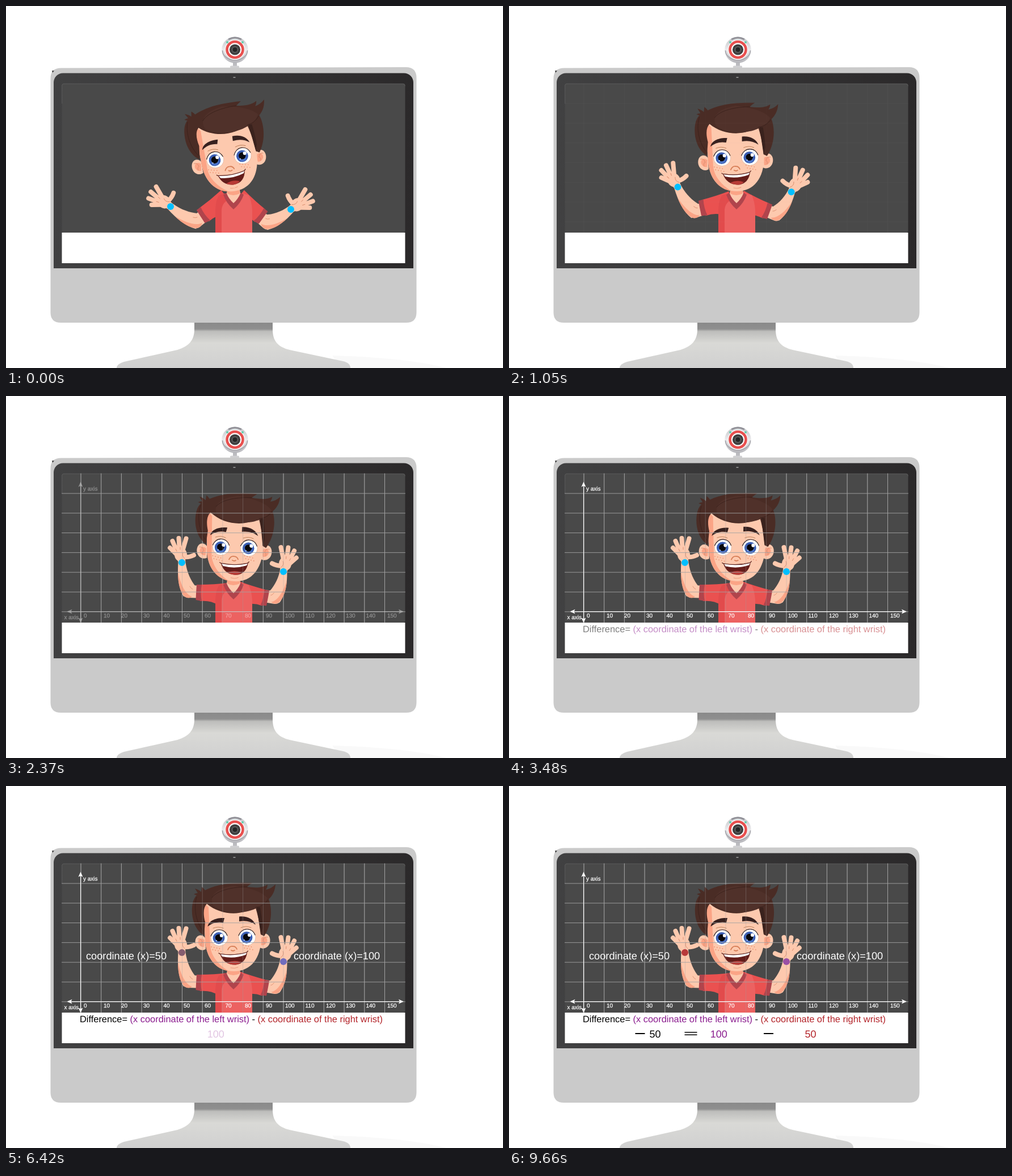
Write an HTML page that moves like this. It is 876 by 639 pixels and loops after 9750 ms.

```html
<!DOCTYPE html>
<html lang="en">
<head>
<meta charset="utf-8">
<title>Wrist difference</title>
<style>
  html, body { margin: 0; width: 100%; height: 100%; overflow: hidden; background: #fff; }
  svg { display: block; }
  text { font-family: "Liberation Sans", Arial, sans-serif; white-space: pre; text-rendering: geometricPrecision; }
</style>
</head>
<body>
<svg id="stage" width="876" height="639" viewBox="0 0 876 639"></svg>
<script>
const LOOP = 9750;
const SKIN = '#fdc9ae', SHADE = '#fba486', RED = '#ea5150', DARK_RED = '#b0444c';
const PURPLE = '#8b1d8f', CRIMSON = '#b3242a';
const PIVOT = { x: 400, y: 325 };
const SHOULDER = { x: 378, y: 347 };
const MIRROR = 798;

const range = n => [...Array(n).keys()];
const path = (d, fill, extra = '') => `<path d="${d}" fill="${fill}" ${extra}/>`;
const line = (d, color, width, extra = '') =>
  path(d, 'none', `stroke="${color}" stroke-width="${width}" stroke-linecap="round" stroke-linejoin="round" ${extra}`);
const circle = (x, y, r, fill, extra = '') => `<circle cx="${x}" cy="${y}" r="${r}" fill="${fill}" ${extra}/>`;
const text = (x, y, size, fill, content) => `<text x="${x}" y="${y}" font-size="${size}" fill="${fill}">${content}</text>`;
const group = (id, content) => `<g id="${id}">${content}</g>`;

const defs = `<defs>
  <linearGradient id="bezel"><stop stop-color="#414142"/><stop offset="1" stop-color="#2b292a"/></linearGradient>
  <linearGradient id="stand" x2="0" y2="1">
    <stop stop-color="#8a8a8a"/><stop offset=".14" stop-color="#8f8f8f"/><stop offset=".19" stop-color="#bdbdbb"/>
    <stop offset=".45" stop-color="#d9d9d6"/><stop offset="1" stop-color="#d0d0d0"/>
  </linearGradient>
  <linearGradient id="cam" x2="0" y2="1"><stop stop-color="#c3c3c7"/><stop offset=".5" stop-color="#ececee"/><stop offset="1" stop-color="#b4b4b9"/></linearGradient>
  <clipPath id="screen"><rect x="98.5" y="137" width="605" height="263"/></clipPath>
</defs>`;

const webcam = `
  <rect x="400" y="97" width="7" height="9" fill="#bcbcc0"/><rect x="395" y="105.5" width="16" height="4" rx="1.5" fill="#d0d0d2"/>
  ${circle(403.5, 77.5, 23.3, 'url(#cam)')}
  ${line('M393 58.5 Q403.5 53 414 58.5', '#8f8f96', 2.6)}
  ${line('M381.5 79 C383 101 424 101 425.5 79', '#a2a2a8', 1.6)}
  ${circle(403.5, 77, 18, '#f4f4f4')}${circle(403.5, 77, 14, '#fff', 'stroke="#e8504f" stroke-width="4.6"')}
  ${circle(403.5, 77, 9.6, '#3f3f3f')}${circle(403.5, 77, 6, '#5c5c5c')}${circle(403.5, 77, 4, '#262626')}
  ${circle(390, 64, 2, '#62cfae')}${circle(417, 64, 2, '#62cfae')}`;

const monitor = `
  ${path('M575 617 Q710 621 776 639 H590Z', '#f9f9f9')}
  ${path('M332 559 H470 V571 C470 592 480 602 500 607 L594 627 Q607 630 607 639 H195 Q195 632 208 628 L302 607 C322 601 332 590 332 571Z', 'url(#stand)')}
  ${path('M97 109.5 L705 108 Q723.5 108 723.5 127 V541 Q723.5 559 705 559 H97 Q78.5 559 78.5 541 V128 Q78.5 109.5 97 109.5Z', '#cacaca')}
  ${path('M81 114 h4 l-3 4Z', '#444')}
  ${path('M84 463 V135 A16.5 16.5 0 0 1 100.5 118.5 H701.5 A16.5 16.5 0 0 1 718 135 V463Z', 'url(#bezel)')}
  <rect x="400.5" y="125.3" width="4" height="1.4" fill="#a5a5a5"/>
  <rect x="98.5" y="137" width="605" height="263" rx="3" fill="#494949"/>
  ${line('M98.7 172 V140 Q99 137.3 102 137.3 H700 Q703 137.5 703.3 141', '#636363', .7)}`;

// Arm at rest with raised hand; the hand and forearm are placed from the wrist.
const fingers = 'M1 -20 L7.5 -42.5 M-4 -20 L-5.5 -43 M-8 -18 L-16.5 -38 M-9 -14 L-21 -26 M3 -10 Q13 -9 21 -13';
const arm = (side, reach) => `<g ${side === 'right' ? `transform="translate(${MIRROR} 0) scale(-1 1)"` : ''}>
  <path id="${side}Upper" fill="none" stroke="${SKIN}" stroke-width="22" stroke-linecap="round"/>
  <g id="${side}Fore">
    <g transform="scale(1 ${reach})">
      ${path('M-6.5 0 C-8 22 -7 42 3 60 L24 42 C16 32 9 18 6.5 0Z', SKIN)}
      ${path('M-7 17 C-7 38 -3 52 5 60 Q12 65 18 60 C7 57 -2 40 -7 17Z', SHADE)}
      ${line('M14 42 q2 4 5 5', '#d98a6b', .8)}
    </g>
    ${line(fingers, SKIN, 8)}
    <ellipse cx="-2" cy="-14" rx="11" ry="12.5" fill="${SKIN}"/>
    ${path('M-6.5 0 Q-7 -5 -11 -9 H6 Q6 -5 6.5 0Z', SKIN)}
    ${line('M5 -7 Q-1 -12 2 -18 M-3 -27 V-23 M-11 -24 L-9 -20', '#d98a6b', .9)}
  </g>
  <g id="${side}Sleeve">
    ${path('M14 -17 Q-12 -14 -36 -14 L-36 15 Q-18 13 -4 22 L14 22Z', RED)}
    ${path('M-42 -14 H-33 Q-36 1 -33 15 L-43.5 13 Q-43 0 -42 -14Z', DARK_RED)}
  </g></g>`;

const torso = `
  ${path('M386 331 Q401 340 417 331 L428 334 Q433 345 434 360 V402 H369 V360 Q370 342 375 334Z', '#ec6261')}
  ${path('M386 331 L375 334 Q369 345 369 360 V402 H380 V362 Q380 348 392 342Z', '#e24b4c')}
  ${path('M383 333 L388 330 H414 L419 333 Q414 348 401 359 Q388 348 383 333Z', DARK_RED)}
  ${path('M391 318 H411 L413 331 Q409 341 401 348 Q393 341 389 331Z', SKIN)}
  ${path('M390 322 Q401 331 411 322 L412 331 Q400 337 390 331Z', SHADE)}`;

const eye = (x, y) => `
  <ellipse cx="${x + 1}" cy="${y}" rx="15" ry="14.3" fill="#fff" stroke="#d9a184" stroke-width=".6"/>
  ${line(`M${x - 14} ${y - 3} Q${x - 9} ${y - 14.5} ${x + 1} ${y - 14.3} Q${x + 11} ${y - 14} ${x + 15} ${y - 4}`, '#2f2020', 1.1)}
  ${circle(x, y + .5, 10.4, '#3a5eb4')}${circle(x, y + 3, 7, '#4c74c8')}
  ${circle(x, y, 6.2, '#08080c')}${circle(x + 5, y - 4, 3.1, '#fff')}${circle(x - 4, y + 5, 1, '#cfe0ff')}
  ${line(`M${x - 10} ${y - 17} q9 -4 18 0`, '#b77a51', .9)}`;
const freckles = (x, y) => range(8).map(i => circle(x + i * 2.4, y + (i * 5) % 9, .9, '#ee9473')).join('');
const ear = (x, y, flip) => `<g transform="translate(${x} ${y}) scale(${flip} 1)">
  ${path('M9 -8 C2 -17 -9 -12 -8.5 0 C-8 11 2 17 10 12Z', SKIN)}
  ${path('M8 -4 C2 -10 -5 -5 -3 2 Q0 9 7 8Z', SHADE)}${line('M-4 -6 Q2 -8 4 0 Q0 2 2 6', '#d98a6b', .9)}</g>`;

const head = `
  ${ear(342, 276, 1)}${ear(457, 273, -1)}
  ${path('M351 206 C346 225 350 250 351 270 C352 306 372 327 402 327 C432 327 449 304 450 268 C450 245 446 225 440 206Z', SKIN)}
  ${path('M349 206 C347 230 350 250 351 270 C352 304 371 324 392 326.5 C374 315 361 300 360 281 L357 214Z', SHADE)}
  ${path('M349 264 C338 258 326 240 328 214 C329 203 332 197 336 193 L331 191 Q335 189 338 189 L333 181 Q340 183 344 187 L345 178 Q349 181 351 184 C372 174 394 170 434 171 Q428 175 425 178 C440 180 452 180 461 174 Q461 179 458 183 Q468 181 475 173.5 C474 186 470 193 463 200 C469 214 470 242 455 265 L449 262 C448 245 444 228 439 212 C420 229 380 230 354 208 C348 214 347 225 351 240Z', '#4a2c25')}
  ${path('M365 211 C358 196 366 182 400 176 C425 179 450 185 461 198 C450 223 395 233 365 211Z', '#50312a')}
  ${line('M336 196 C330 215 335 240 347 256 M425 178 C400 178 372 184 363 197 M462 201 C455 210 448 213 440 214', '#38201b', .8)}
  ${path('M442 214 L449 262 L452 250 Q451 230 448 214Z', '#3a221d')}
  ${path('M355.5 248 C357 238 370 232 385 233 L383 241 C372 239 363 242 355.5 248Z', '#38211f')}
  ${path('M411 230.5 C425 229 436 235 440 245 C432 239 422 237 411 239Z', '#38211f')}
  ${eye(375, 268)}${eye(424, 267)}
  ${line('M391 289 Q394 282 400 283 Q405 283 407 288 M397 290 Q400 292 403 290', '#d77f58', 1.8)}
  ${freckles(362, 284)}${freckles(418, 281)}
  ${path('M377 296 Q402 300 425 293 C424 306 416 315.5 403 315.5 C391 315.5 381 309 377 296Z', '#641d1a')}
  ${path('M390 312 Q402 306 414 311 Q409 315.5 403 315.5 Q396 315.5 390 312Z', '#b83a35')}
  ${path('M378 296.5 Q402 300 424.5 293.5 L422.5 298 Q402 305.5 381 301Z', '#fff')}
  ${line('M375 295 Q377 297 379 296.5 Q402 300 423 294 Q426 293 426.5 291', '#5b211c', 1.2)}
  ${line('M396 321 q7 2 13 -1', '#e89a79', 1)}`;

const GRID_COLOR = '#a2a2a2';
const columns = range(16).map(k => `M${132 + 35.7 * k} 137 V400`).join('');
const rows = range(7).map(k => `M98.5 ${172 + 34.8 * k} H703.5`).join('');

const arrow = (x, y, angle) => `<path d="M0 0 L-4 9 L0 7 L4 9Z" fill="#fff" transform="translate(${x} ${y}) rotate(${angle})"/>`;
const tickX = [137, 172, 203, 242, 277.5, 313, 350, 386.5, 421, 458, 492, 527.5, 564, 599, 634.5, 672];
const axes = `${line('M131.5 155 V397 M110 380.6 H698', '#fff', 1.1)}
  ${arrow(131.5, 151.5, 0)}${arrow(131.5, 400.5, 180)}${arrow(107.5, 380.6, -90)}${arrow(701, 380.6, 90)}
  <g stroke="#fff" stroke-width=".25">
  ${text(136, 167, 10, '#fff', 'y axis')}${text(102.5, 394, 10, '#fff', 'x axis')}
  ${tickX.map((x, i) => text(x, 390.5, 10, '#fff', i * 10)).join('')}</g>`;

const formula = text(130, 417, 16.4, '#000', 'Difference= ' +
  `<tspan fill="${PURPLE}">(x coordinate of the left wrist)</tspan> - ` +
  `<tspan fill="${CRIMSON}">(x coordinate of the right wrist)</tspan>`);

// Columns lie behind the boy and shine through him faintly; rows cross in front.
document.getElementById('stage').innerHTML = defs + webcam + monitor +
  group('columns', line(columns, GRID_COLOR, 1)) +
  `<g clip-path="url(#screen)">${arm('left', 1)}${arm('right', .92)}${torso}${group('head', head)}</g>
  <rect x="98.5" y="400" width="605" height="54" fill="#fff"/>` +
  group('rows', line(rows, GRID_COLOR, 1, 'stroke-opacity=".9"') + line(columns, GRID_COLOR, 1, 'stroke-opacity=".35"')) +
  group('axes', axes) +
  '<circle id="leftDot" r="6"/><circle id="rightDot" r="6"/>' +
  group('coordinates', text(141, 305.5, 18.2, '#fff', 'coordinate (x)=50') + text(507, 305.5, 18.2, '#fff', 'coordinate (x)=100')) +
  group('formula', formula) +
  group('minuend', text(354.8, 444, 18, PURPLE, '100')) +
  group('minus', path('M449 436 h17 v2 h-17Z', '#000')) +
  group('subtrahend', text(521.5, 444, 18, CRIMSON, '50')) +
  group('equals', path('M309.5 434 h22 v1.6 h-22Z M309.5 438.4 h22 v1.6 h-22Z', '#000')) +
  group('result', path('M222.5 436 h17 v2 h-17Z', '#000') + text(247.5, 444, 18, '#000', '50'));

const $ = Object.fromEntries([...document.querySelectorAll('[id]')].map(e => [e.id, e]));

const fades = {
  columns: [1000, 1980], rows: [1000, 1980], axes: [2000, 2970], formula: [3000, 3960], coordinates: [4790, 5430],
  minuend: [6250, 6930], minus: [6960, 7620], subtrahend: [7710, 8400], equals: [8370, 9030], result: [9000, 9660]
};

// Each key: time, then the values at that time.
const headKeys = [[0, -7.4], [570, -3.5], [1470, 2.6], [1980, 3.9], [2370, 3.2], [4290, 0]];
// Wrist x, wrist y, forearm turn, sleeve turn; the right arm is mirrored.
const armKeys = {
  left: [[0, 290, 354, -46, -36], [570, 290, 341, -37, -27], [1470, 304, 301, -7, -3], [1980, 310, 294, 0, 0]],
  right: [[0, 296, 359, -46, -39], [570, 295, 341, -33, -31], [1470, 305, 317, -9, -16], [1980, 309, 310, -4, -14]]
};

const progress = (t, from, to) => Math.min(1, Math.max(0, (t - from) / (to - from)));
const mix = (a, b, k) => a.map((v, i) => v + (b[i] - v) * k);
function pose(keys, t) {
  const next = keys.findIndex(key => key[0] > t);
  if (next < 0) return keys.at(-1).slice(1);
  const a = keys[next - 1], b = keys[next];
  return mix(a, b, progress(t, a[0], b[0])).slice(1);
}

function drawArm(side, t, reach, dotColor) {
  const [x, y, turn, sleeve] = pose(armKeys[side], t);
  const a = turn * Math.PI / 180, ex = 11, ey = 51 * reach;
  const elbow = [x + ex * Math.cos(a) - ey * Math.sin(a), y + ex * Math.sin(a) + ey * Math.cos(a)];
  $[side + 'Upper'].setAttribute('d', `M${SHOULDER.x} ${SHOULDER.y} L${elbow}`);
  $[side + 'Fore'].setAttribute('transform', `translate(${x} ${y}) rotate(${turn})`);
  $[side + 'Sleeve'].setAttribute('transform', `translate(${SHOULDER.x} ${SHOULDER.y}) rotate(${sleeve})`);
  const dot = $[side + 'Dot'];
  dot.setAttribute('cx', side === 'right' ? MIRROR - x : x);
  dot.setAttribute('cy', y);
  dot.setAttribute('fill', `rgb(${mix([0, 191, 255], dotColor, progress(t, 5670, 6700))})`);
}

function frame(now) {
  const t = now % LOOP;
  for (const id in fades) $[id].setAttribute('opacity', progress(t, ...fades[id]));
  $.head.setAttribute('transform', `rotate(${pose(headKeys, t)} ${PIVOT.x} ${PIVOT.y})`);
  drawArm('left', t, 1, [184, 56, 58]);
  drawArm('right', t, .92, [155, 79, 165]);
  requestAnimationFrame(frame);
}
frame(performance.now());
</script>
</body>
</html>
```
